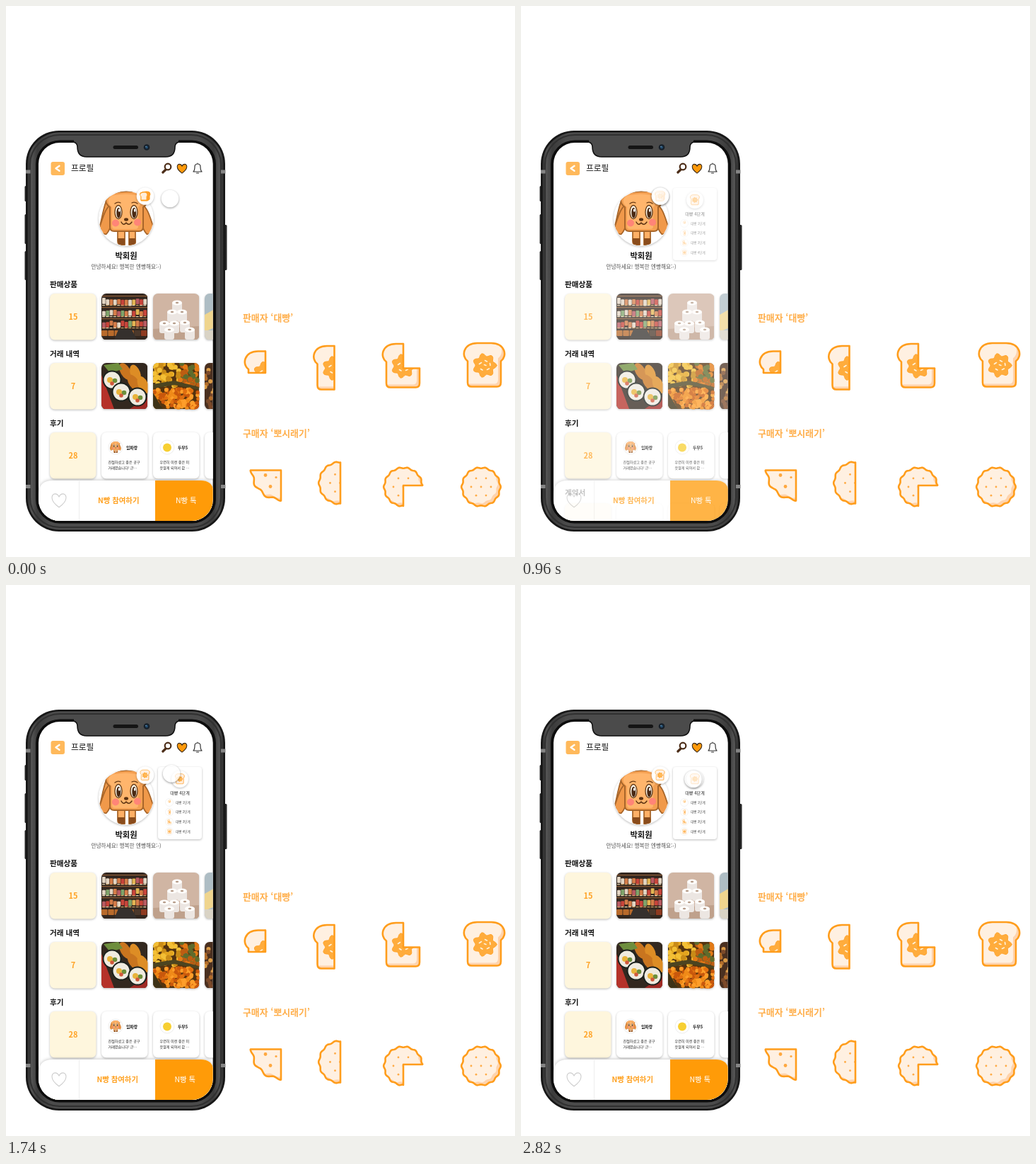
An HTML page for the animation above (2.85 s loop, 720x778 px).

```html
<!DOCTYPE html>
<html lang="ko">
<head>
<meta charset="utf-8">
<style>
html, body { margin: 0; width: 100%; height: 100%; overflow: hidden; background: #fff }
svg { display: block; font-family: "Noto Sans CJK KR", "Noto Sans CJK", "Noto Sans", sans-serif }
.soft { filter: drop-shadow(0 1px 1.5px #0004) }
</style>
</head>
<body>
<svg id="stage" width="720" height="778" viewBox="0 0 720 778"></svg>
<script>
const LOOP = 2850, ORANGE = '#ff9d1c', CREAM = '#fff0e1', SHADE = '#ffd3ac';
let seed = 7;
const rnd = () => (seed = (seed * 16807) % 2147483647) / 2147483647;
const pick = list => list[Math.floor(rnd() * list.length)];
const times = (n, f) => Array.from({ length: n }, (_, i) => f(i)).join('');

const text = (x, y, size, str, fill = '#111', weight = 700, anchor = 'start') =>
  `<text x="${x}" y="${y}" font-size="${size}" fill="${fill}" font-weight="${weight}" text-anchor="${anchor}">${str}</text>`;
const rect = (x, y, w, h, fill, r = 0, more = '') =>
  `<rect x="${x}" y="${y}" width="${w}" height="${h}" rx="${r}" fill="${fill}" ${more}/>`;
const oval = (x, y, rx, ry, fill, more = '') =>
  `<ellipse cx="${x}" cy="${y}" rx="${rx}" ry="${ry}" fill="${fill}" ${more}/>`;
const dot = (x, y, r, fill, more) => oval(x, y, r, r, fill, more);
const path = (d, fill, stroke = 'none', w = 1, more = '') =>
  `<path d="${d}" fill="${fill}" stroke="${stroke}" stroke-width="${w}" stroke-linejoin="round" stroke-linecap="round" ${more}/>`;
const use = (id, x, y, s = 1) => `<use href="#${id}" transform="translate(${x} ${y}) scale(${s})"/>`;

// Bread and biscuit pieces
const toast = 'M6.5 26C-3 19 0 1 20 .5H40C60 1 63 19 53.5 26V56Q53.5 62 48 62H12Q6.5 62 6.5 56Z';
const wavy = (cx, cy, r, bumps, depth = .8) => 'M' + Array.from({ length: 121 }, (_, i) => {
  const a = i * Math.PI / 60, q = r + depth * Math.cos(bumps * a);
  return (cx + q * Math.cos(a)).toFixed(1) + ' ' + (cy + q * Math.sin(a)).toFixed(1);
}).join('L') + 'Z';
const jam = path(wavy(30.5, 32, 15, 7, 2), '#ffac3c', '#ffa128', 1) +
  path('M23 30l3-2M31 25l3 1.5M38 29l.5 3M25 37l2.5 1.5M34 38l3-1.5M30 31l2.5 1', 'none', '#fff3dc', 1.6);
const crumbs = times(7, i => dot(30 + (i ? 14 * Math.cos(i * 1.047) : 0), 30 + (i ? 14 * Math.sin(i * 1.047) : 0), 1.4, '#ffab45'));

const piece = (id, shape, top, keep, cut) => `
  <clipPath id="${id}K"><path d="${keep}"/></clipPath><clipPath id="${id}S"><path d="${shape}"/></clipPath>
  <g id="${id}"><g clip-path="url(#${id}K)"><g clip-path="url(#${id}S)">
    ${path(shape, SHADE)}${path(shape, CREAM, 'none', 1, 'transform="translate(-4 -4)"')}${top}</g>
    ${path(shape, 'none', ORANGE, 2.6)}</g>${path(cut, 'none', ORANGE, 2.6)}</g>`;
const ALL = 'M-9-9H80V80H-9Z', LEFT = 'M-9-9H30.5V80H-9Z';
const round = wavy(30, 30, 27, 14);
const pieces =
  piece('toast1', toast, jam, 'M-9-9H30.5V31H-9Z', 'M30.5 .5V31H6.5') +
  piece('toast2', toast, jam, LEFT, 'M30.5 .5V62') +
  piece('toast3', toast, jam, 'M-9-9H30.5V35H80V80H-9Z', 'M30.5 .5V35H53.5') +
  piece('toast4', toast, jam, ALL, '') +
  piece('bis1', wavy(44, 0, 41.5, 12, 1.8), dot(22, 7, 2.4, '#ffa83f') + dot(29, 23, 2.4, '#ffa83f') + dot(37, 10, 1.6, '#ffa83f'), 'M-9 0H44V60H-9Z', 'M1 0H44V43') +
  piece('bis2', wavy(30, 30, 29.5, 14), crumbs, LEFT, 'M30.5 1V59') +
  piece('bis3', round, crumbs, 'M-9-9H80V28H30V80H-9Z', 'M57 28H30V57') +
  piece('bis4', round, crumbs, ALL, '');

// Photo cards, drawn in a 65 x 65 box
const snack = ['#c8443a', '#e3b553', '#e3d5c3', '#7fa36a', '#d47c48', '#8ea0aa', '#b85a62'];
const shelves = rect(0, 0, 65, 65, '#33271f') +
  times(3, r => rect(0, 3 + r * 16, 65, 1.2, '#8d5c36') + times(12, i =>
    rect(1 + i * 5.3, 6 + r * 16 + rnd() * 3, 4.8, 7 + rnd() * 2, pick(snack), 1) +
    rect(1 + i * 5.3, 16 + r * 16, 4, 1.2, pick(['#e8d7b0', '#c9a066'])))) +
  times(7, i => rect(i * 9.3, 52, 8.5, 8, pick(['#8e3a20', '#4b382b', '#b86a2b']), 1)) + path('M18 65L24 51H43L50 65Z', '#35302d');
const roll = (x, y) => rect(x - 7, y - 6, 14, 15, '#ece6e2', 3) + oval(x, y - 5, 7, 3.6, '#fffdfb') + oval(x, y - 5, 2.2, 1.2, '#b59c8a');
const rolls = rect(0, 0, 65, 65, '#d0b5a3') + path('M0 50L65 46V65H0Z', '#bfa18c') +
  [[34, 18], [27, 31], [41, 31], [16, 47], [30, 47], [45, 46], [23, 56], [52, 56]].map(p => roll(...p)).join('');
const sushi = rect(0, 0, 65, 65, '#33281f') + path('M0 17L18 65H0Z', '#b5322a') + path('M40 65L65 48V65Z', '#9f2a24') +
  [[34, 12, 60], [48, 15, 70], [46, 28, 55], [59, 31, 65]].map(([x, y, a]) => oval(x, y, 13, 7, y % 2 ? '#dd8d25' : '#c9751f', `transform="rotate(${a} ${x} ${y})"`)).join('') +
  path('M3 3L24 0L30 9L12 14Z', '#6e8e3d') +
  [[15, 24], [28, 41], [51, 48]].map(([x, y]) => dot(x, y, 13.5, '#1b211d') + dot(x, y, 11.5, '#efebe0') + dot(x - 3, y, 4, '#e8b33a') + dot(x + 4, y + 1, 3.3, '#6d8f3c') + dot(x, y + 5, 2.8, '#d0583b')).join('');
const fruit = rect(0, 0, 65, 65, '#54330f') +
  times(90, () => { const x = rnd() * 65, y = rnd() * 32; return dot(x, y, 3.6, x < 38 ? pick(['#e4a51f', '#f3bf35', '#c98b17']) : pick(['#e37a16', '#bd5d12', '#5f6b2c'])); }) +
  path('M0 30L30 25L65 34V38L30 31L0 36Z', '#4c4420') +
  times(150, () => dot(rnd() * 65, 37 + rnd() * 29, 2.7, pick(['#f08a18', '#e06f10', '#c9580c', '#ff9e2a']))) + path('M0 42L14 65H0Z', '#3d3217');
const cheese = rect(0, 0, 65, 65, '#aebdc4') + path('M0 30L14 22V48L0 54Z', '#efd58e') + rect(0, 52, 65, 13, '#d9d3c5');
const market = rect(0, 0, 65, 65, '#4a3020') + times(14, i => dot(rnd() * 14, 10 + i * 4, 3, pick(['#b06c2b', '#7c4a2a', '#d99a45'])));

const xs = [62, 135, 208, 281];
const card = (x, y, fill) => rect(x, y, 65.5, 65.5, fill, 7, 'class="soft"');
const photo = (i, y, art) => `<g class="soft"><g transform="translate(${xs[i]} ${y})" clip-path="url(#card)">${art}</g></g>`;
const count = (y, n) => card(62, y, '#fef6dd') + text(95, y + 36.5, 11, n, '#ffa326', 700, 'middle');
const review = (i, name, a, b, face) => card(xs[i], 602, '#fff') + dot(xs[i] + 20, 623, 10, '#fff', 'stroke="#eee"') + face +
  text(xs[i] + 35, 626, 5.8, name) + text(xs[i] + 9.5, 646, 5.1, a, '#222', 500) + text(xs[i] + 9.5, 654, 5.1, b, '#222', 500);

// Bread mascot
const BROWN = '#a8662a';
const arm = path('M149 280C140 285 137 300 132 313Q133 323 142 322Q148 315 151 302Z', '#f0994a', BROWN, 1.8);
const mascot = '<g clip-path="url(#face)">' +
  path('M147 268C139 274 137 296 132 314L141 318L149 290Z', '#f0994a', BROWN, 1.8) + arm +
  `<g transform="translate(341 0) scale(-1 1)">${arm}</g>` +
  path('M158 314V332Q158 337 163 337H168V314ZM174 314V337H179Q184 337 183 332V314Z', '#ffb066', BROWN, 1.8) +
  path('M158 328H168V337H162Q157 337 158 328ZM174 328H183Q185 336 180 337H174Z', '#8a4c1c') +
  path('M147 284C137 277 141 265 152 264Q170 260 189 263C201 265 203 278 194 284V312Q194 318 188 318H153Q147 318 147 312Z', '#f4a052', BROWN, 2) +
  path('M150 284C141 277 145 268 154 267Q170 264 184 267C193 269 195 278 187 284V311Q187 315 183 315H154Q150 315 150 311Z', '#ffb56c') +
  [159, 181].map(x => oval(x, 291, 5, 9.5, '#fff8e9', 'stroke="#5e3513" stroke-width="1.3"') + oval(x + .3, 292, 3, 7.3, '#4a2a14') + oval(x + 1.2, 288.5, 1.3, 2.2, '#fff')).join('') +
  path('M154 279Q158 276 162 278M178 278Q182 276 186 279', 'none', '#6b3c15', 1.3) +
  dot(155, 306.5, 5, '#ff8577') + dot(186, 305.5, 5, '#ff8577') +
  oval(170, 301.5, 3, 2.2, '#5a3212') + path('M163 305Q166 311 170 306Q174 311 178 305', 'none', '#5a3212', 1.5) + '</g>';

const loaf = path('M193 263Q200 261 203 263Q205 266 203 268V273L200 275H191V268Q187 264 193 263Z', '#ff9f2c', ORANGE, 1) +
  path('M191 264Q196 262 199 264Q201 267 199 269V274H191V269Q188 266 191 264Z', '#ffeeda', ORANGE, .9);
const heart = 'M0 6C-10-1-7-7-4-7Q-1-7 0-4Q1-7 4-7C7-7 10-1 0 6Z';

const header = rect(63.5, 220, 19.5, 19, '#ffb95b', 3) + path('M75.5 225.8L70.5 229.3L75.5 232.8', 'none', '#fff', 2.3) +
  text(92, 233, 11.7, '프로필', '#111', 500) +
  path('M226 231L221.8 235', 'none', '#4b2c17', 3.2) + dot(229, 227, 4.3, '#fff', 'stroke="#4b2c17" stroke-width="2.2"') +
  path(heart, '#ff9a0b', '#3d2a18', 1.1, 'transform="translate(249 230.2) scale(.98)"') +
  path('M265 234Q267 232 267 227Q267 223 271 223Q275 223 275 227Q275 232 277 234ZM269.5 236H272.5M271 222V223', '#fff', '#333', 1.2);

const panel = rect(215, 257, 62, 102, '#fff', 4, 'class="soft"') + dot(246, 274, 12, '#fff', 'class="soft"') +
  use('toast4', 239, 266.5, .23) + text(246, 296, 6.1, '대빵 4단계', '#222', 500, 'middle') +
  times(4, i => { const y = 307 + i * 13.7; return dot(231, y, 5.5, '#fff', 'stroke="#f1f1f1" stroke-width=".8"') +
    use('toast' + (i + 1), i < 2 ? 229.2 : 228, y - 3.4, .105) + text(240, y + 1.6, 4.6, '대빵 ' + (i + 1) + '단계', '#555', 400); });

const bar = path('M46 727V690Q46 670 66 670H276Q294 670 294 690V727Z', '#fff', 'none', 1, 'style="filter:drop-shadow(0 -1px 2px #0003)"') +
  path('M211 670H276Q294 670 294 690V727H211Z', '#ff9b08') + path('M103.5 670V727', 'none', '#eee', 1) +
  path(heart, 'none', '#ccc', .75, 'transform="translate(75 699) scale(1.45)"') +
  `<g id="labels">${text(130, 701.5, 10.4, 'N빵 참여하기', '#ffa01e')}${text(240, 701.5, 10.4, 'N빵 톡', '#fff', 500)}</g>`;

const screen = header + dot(170, 300, 39, '#fff', 'class="soft"') + mascot +
  dot(197, 268.5, 12.3, '#fff', 'class="soft"') + `<g id="before">${loaf}</g><g id="after">${use('toast4', 189.5, 261, .235)}</g>` +
  text(170, 357, 11.3, '박회원', '#111', 700, 'middle') + text(170, 371, 7.7, '안녕하세요! 행복한 엔빵해요:-)', '#555', 400, 'middle') +
  ['판매상품', '거래 내역', '후기', '계약서'].map((s, i) => text(62, 396.5 + i * 98, 10.6, s)).join('') +
  '<g id="cards">' + count(406, 15) + photo(1, 406, shelves) + photo(2, 406, rolls) + photo(3, 406, cheese) +
  count(504, 7) + photo(1, 504, sushi) + photo(2, 504, fruit) + photo(3, 504, market) + count(602, 28) +
  review(1, '임파랑', '친절하셨고 좋은 공구', '거래였습니다! 근⋯', `<g transform="translate(118.5 558.5) scale(.215)">${mascot}</g>`) +
  review(2, '두부5', '우연히 이런 좋은 이', '웃알게 되어서 값 ⋯', dot(228, 623.5, 6, '#f7cf32')) + card(281, 602, '#fff') +
  xs.map((x, i) => card(x, 702, i ? '#fff' : '#fef6dd')).join('') + '</g>' +
  `<g id="panel">${panel}</g><g id="bar">${bar}</g>` +
  `<g id="cursor" opacity=".65"><g style="filter:drop-shadow(0 1px 1.6px #0009)">${dot(0, 0, 12.3, '#fff')}</g></g>`;

const phone = [[26.5, 254, 22], [26.5, 294, 42], [26.5, 346, 41], [308, 309, 64]].map(([x, y, h]) => rect(x, y, 4.5, h, '#262626', 1.5)).join('') +
  rect(28, 176, 282, 566, '#171717', 47) + rect(30.5, 178.5, 277, 561, 'url(#metal)', 45) +
  rect(34, 182, 270, 554, 'none', 42, 'stroke="#303030" stroke-width="2"') +
  [[28, 231.5], [304, 231.5], [28, 676], [304, 676]].map(([x, y]) => rect(x, y, 6.5, 5, '#858585')).join('') +
  rect(42, 189.5, 255, 541, '#0c0c0c', 34) + rect(46, 193, 246.7, 534, '#fff', 30);
const notch = path('M96 188H244V193Q239 194 239 199Q239 213 226 213H114Q101 213 101 199Q101 194 96 193Z', '#4b4b4b') +
  path('M96 192Q101 194 101 199Q101 213 114 213H226Q239 213 239 199Q239 194 244 192', 'none', '#111', 1.6) +
  rect(151.5, 197, 35.5, 5, '#151515', 2.5) + dot(199, 199.5, 4.3, '#17202a') + dot(199, 199.5, 2, '#244d70') + dot(198, 198.5, .7, '#7eb0d2');

const gallery = text(335, 445, 12.9, '판매자 ‘대빵’', '#ffaf4c') + text(335, 608, 12.9, '구매자 ‘뽀시래기’', '#ffaf4c') +
  use('toast1', 336.5, 487) + use('toast2', 434, 479.5) + use('toast3', 531.5, 476.5) + use('toast4', 646.5, 475.5) +
  use('bis1', 345, 655.5) + use('bis2', 442.5, 643.5) + use('bis3', 532, 649) + use('bis4', 642, 649);

document.getElementById('stage').innerHTML = `<defs>${pieces}
  <linearGradient id="metal"><stop stop-color="#2c2c2c"/><stop offset=".02" stop-color="#555"/><stop offset=".05" stop-color="#3b3b3b"/>
  <stop offset=".12" stop-color="#4b4b4b"/><stop offset=".88" stop-color="#4b4b4b"/><stop offset=".95" stop-color="#3b3b3b"/>
  <stop offset=".98" stop-color="#555"/><stop offset="1" stop-color="#2c2c2c"/></linearGradient>
  <clipPath id="card"><rect width="65.5" height="65.5" rx="7"/></clipPath>
  <clipPath id="face"><circle cx="170" cy="300" r="38.5"/></clipPath>
  <clipPath id="screen"><rect x="46" y="193" width="246.7" height="534" rx="30"/></clipPath></defs>
  ${phone}<g clip-path="url(#screen)">${screen}</g>${notch}${gallery}`;

const el = id => document.getElementById(id);
const part = (t, from, to) => Math.min(1, Math.max(0, (t - from) / (to - from)));
const easeOut = u => 1 - (1 - u) ** 3;
const fade = (id, v) => el(id).setAttribute('opacity', v);
const move = (id, x, y) => el(id).setAttribute('transform', `translate(${x} ${y})`);

function draw() {
  const t = performance.now() % LOOP;
  const p = part(t, 810, 1110), solid = 1 - p * (1 - p);
  fade('before', 1 - p); fade('after', p); fade('panel', p);
  fade('cards', solid); fade('bar', solid);
  move('labels', p > .6 ? -1.5 : 0, 0);
  const a = easeOut(part(t, 50, 800)), b = easeOut(part(t, 1205, 2500));
  move('cursor', 232 - 35 * a + 46.5 * b, 272 - 3.5 * a + 5.5 * b - 11 * Math.sin(Math.PI * b));
  requestAnimationFrame(draw);
}
draw();
</script>
</body>
</html>
```
